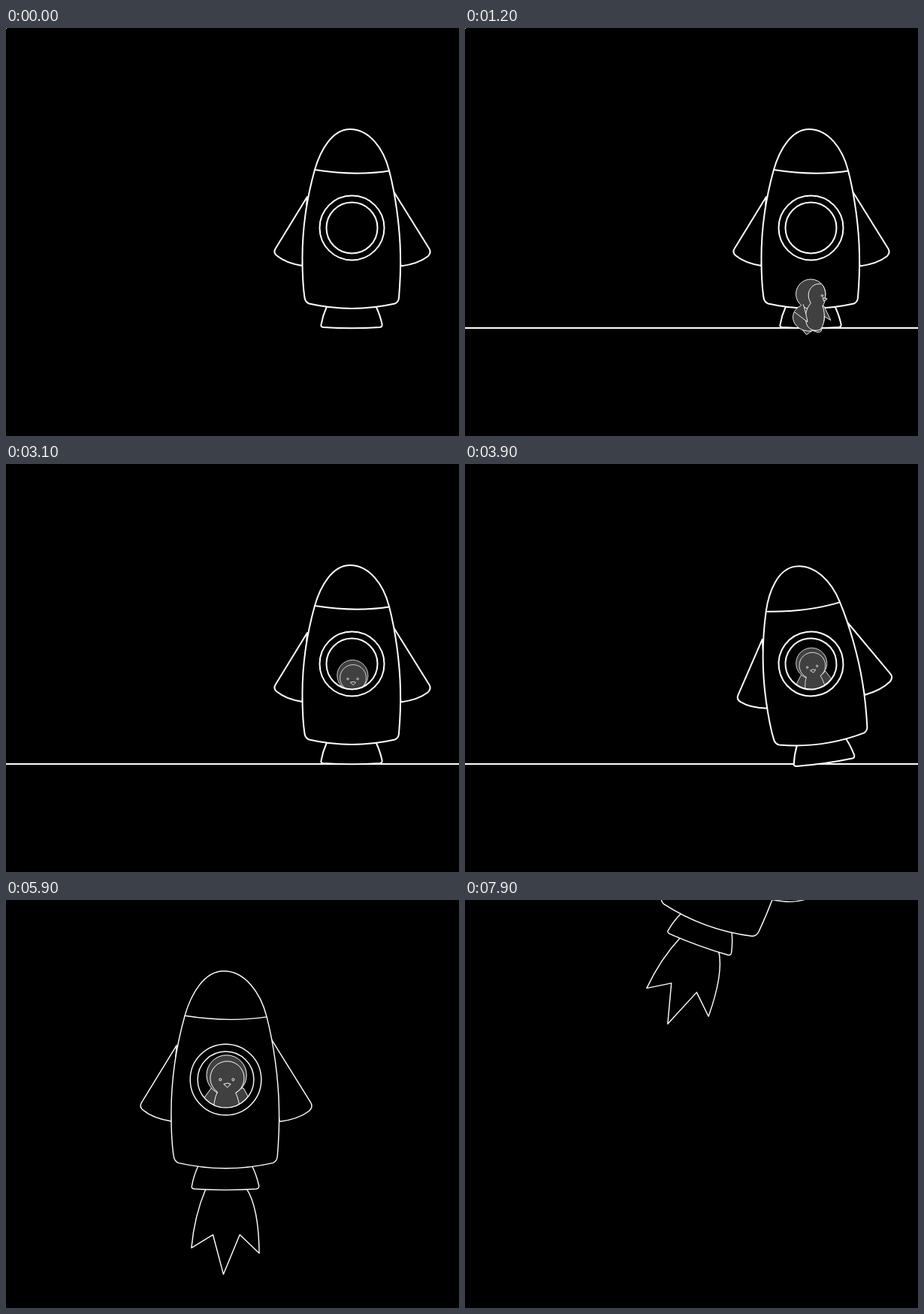
An HTML page with a canvas that plays this animation: 603 by 544 pixels, repeating every 8 s.

```html
<!DOCTYPE html>
<html lang="en">
<head>
<meta charset="utf-8">
<title>Penguin rocket</title>
<style>
  html, body { margin: 0; width: 100%; height: 100%; overflow: hidden; background: #000; }
  canvas { display: block; }
</style>
</head>
<body>
<canvas id="stage" width="603" height="544"></canvas>
<script>
const ctx = document.getElementById('stage').getContext('2d');
const LOOP = 8000;
const GROUND_AT = 100, CLIMB_AT = 1600, BOARD_AT = 2900, LIFT_AT = 4100, SPACE_AT = 4900;
const GREY = '#404041';

const { PI, sin, cos, exp } = Math;
const clamp = u => Math.min(1, Math.max(0, u));
const smooth = u => u * u * (3 - 2 * u);
const progress = (t, from, to) => clamp((t - from) / (to - from));

const path = d => new Path2D(d);
const ellipse = (x, y, rx, ry = rx) => {
  const p = new Path2D();
  p.ellipse(x, y, rx, ry, 0, 0, PI * 2);
  return p;
};

// Rocket parts are centred on the porthole.
const porthole = ellipse(0, 0, 34);
const hull = [
  path('M-59.5-41.5L-102 28Q-105 33-100 37Q-88 47-66 50.5Z'),
  path('M55.5-48.5L103 28Q106 33 101 38Q88 48 65 51Z'),
  path('M-33.5 105Q-39 117-41 129Q-42 132-38 132.5Q0 135 37 132.5Q41 132 40 128Q37 115 32 105Z'),
  path(`M-2.5-131.5C-26-131.5-42-104-49.5-77.5C-60-40-66 0-66 40C-66 62-65 80-63 93
        Q-62 99-57 101Q0 114 57 101Q62 99 62.5 93C64 75 65 55 64.5 35
        C64 0 58-44 49.5-76.5C42-106 23-131.5-2.5-131.5Z`),
  ellipse(0, 0, 43)
];
const noseSeam = path('M-49.5-77.5Q4-69 49.5-76');
const flame = path('M-24 132Q-38 165-41.5 204L-15.5 188L-2.8 236L17 188L40.5 210.5Q40 155 25 132');

// Side view, origin at the feet.
const walker = [
  path('M-7-6L-1 0L6-6Z'),
  path('M8-6Q18-2 19-9Z'),
  path('M17-41L19-40L29.5-22L19-27Z'),
  ellipse(0, -23, 21, 18),
  ellipse(0, -54.5, 19.7),
  path(`M13-69C3-70-3-62-3-54C-3-48 0-45 1-42C-5-34-6-22-2-14C2-5 14-5 18-10
        C23-20 20-35 17-40C20-45 20-50 19.5-54C19.5-60 17-66 13-69Z`),
  path('M-20-29L-1-17Q-5-32-9-40'),
  ellipse(15.3, -53.7, 1.2),
  path('M16.5-51L22.5-50L18-46.5Z')
];

// Front view, seen through the porthole.
const pilot = [
  path('M-17 9.6L-26 22L-34 45L38 45L27.5 21.5L21.5 10.4Z'),
  ellipse(1, -5.5, 24.2),
  path('M-15 45Q-15 24-10 15A20.5 20.5 0 1 1 12 16Q17 26 18 45'),
  ellipse(-6.5, 0, 1.4),
  ellipse(9, 0, 1.4),
  path('M-2.5 5.5Q2 3 6 5.5L2 9.5Z')
];

function placed(x, y, degrees, scale, draw) {
  ctx.save();
  ctx.translate(x, y);
  ctx.rotate(degrees * PI / 180);
  ctx.scale(scale, scale);
  draw();
  ctx.restore();
}

function paint(parts, fill, width) {
  ctx.fillStyle = fill;
  ctx.lineWidth = width;
  for (const part of parts) {
    ctx.fill(part);
    ctx.stroke(part);
  }
}

// Rock on the ground, then accelerate upwards.
function launchPose(t) {
  const lift = Math.max(0, (t - LIFT_AT) / 200);
  const rocking = t >= 3500 && !(lift > 0);
  return {
    x: 460.5 + 6 * lift,
    y: 266.5 - 60 * lift ** 1.75,
    tilt: rocking ? -8 * cos((t - 3900) / 200 * PI) : 0
  };
}

// Rise steadily, settle while leaning left, then turn right and leave.
function spacePose(t) {
  const s = Math.max(0, (t - 5700) / 1000);
  const lean = smooth(progress(t, 5900, 6700));
  const leave = progress(t, 6900, 7900);
  return {
    x: 292.5 - 17.5 * lean + 86.5 * leave,
    y: 224.5 + Math.max(0, 5700 - t) * .605 + 42 * exp(-2.5 * s) * cos(1.5 * PI * s) - 302 * leave ** 1.6,
    tilt: -8 * lean + 28 * sin(leave * PI / 2)
  };
}

function drawWalker(x, y, tilt) {
  placed(x, y, tilt, 1, () => paint(walker, GREY, .9));
}

function walk(t) {
  const phase = (t - 1200) / 500 * PI;
  drawWalker(455.5 + (t - 1200) * .46, 409 - 33 * Math.abs(sin(phase)), 5 * cos(phase));
}

// A ballistic jump out from behind the nose and back down.
function jump(t) {
  drawWalker(460.5, 103 + .00096 * (t - 2000) ** 2, 0);
}

function drawPilot(t) {
  const inSpace = t >= SPACE_AT;
  const drop = inSpace ? 0 : 4 + 62 * (1 - smooth(progress(t, 2700, 3300)));
  ctx.save();
  ctx.clip(porthole);
  placed(0, drop, 0, inSpace ? 1 : .85, () => paint(pilot, GREY, .9));
  ctx.restore();
}

function drawRocket(t) {
  const inSpace = t >= SPACE_AT;
  const { x, y, tilt } = inSpace ? spacePose(t) : launchPose(t);
  const width = inSpace ? 1.3 : 2;
  const fill = t >= CLIMB_AT && t < BOARD_AT ? '#231f20' : '#000';
  placed(x, y, tilt, inSpace ? 1.1 : 1, () => {
    if (t > LIFT_AT) paint([flame], '#000', width);
    paint(hull, fill, width);
    ctx.stroke(noseSeam);
    if (t >= BOARD_AT) drawPilot(t);
    ctx.stroke(porthole);
  });
}

function drawScene(t) {
  ctx.fillStyle = '#000';
  ctx.fillRect(0, 0, 603, 544);
  ctx.strokeStyle = ctx.fillStyle = '#fff';
  ctx.lineJoin = 'round';
  if (t < 2500) ctx.fillRect(0, 0, 1, 1);
  if (t >= GROUND_AT && t < SPACE_AT) ctx.fillRect(0, 399, 603, 2);

  if (t >= CLIMB_AT && t < 2500) jump(t);
  drawRocket(t);
  if (t >= GROUND_AT && t < CLIMB_AT) walk(t);
}

// Poses are held for 100 ms at first, then for 200 ms.
function held(t) {
  const step = t < 2500 ? 100 : 200;
  return t - (t - 2500 + LOOP) % step;
}

function tick() {
  drawScene(held(Math.floor(performance.now() % LOOP)));
  requestAnimationFrame(tick);
}
tick();
</script>
</body>
</html>
```
